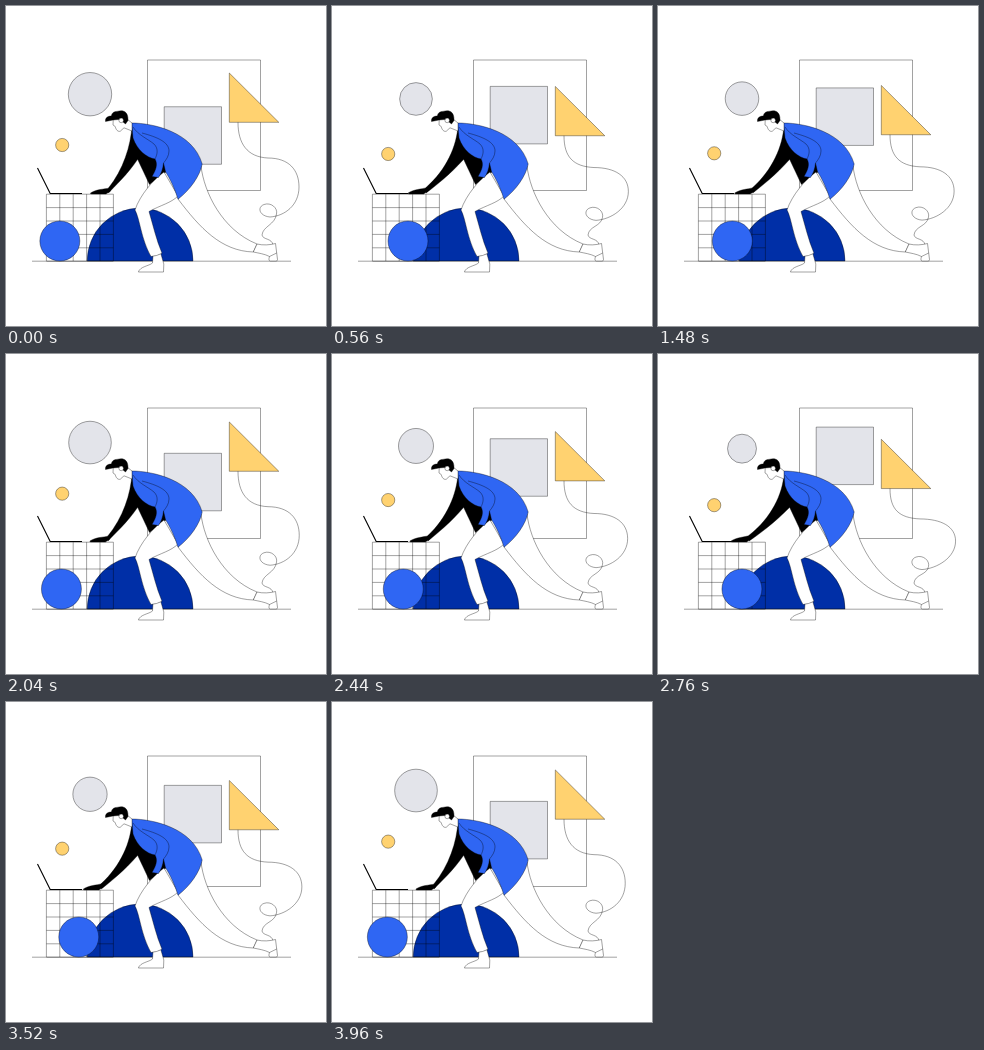
Animation, 320 px wide and 320 px high, one loop 4 s. Source, as an HTML page:

```html
<!DOCTYPE html>
<html lang="en">
<head>
<meta charset="utf-8">
<title>Working pose</title>
<style>
  html, body { margin: 0; width: 100%; height: 100%; overflow: hidden; background: #fff; }
  svg { display: block; width: 100%; height: 100%; }
  .line { fill: none; }
  .white { fill: #fff; }
  .black { fill: #000; }
  .blue { fill: #2f66f3; }
  .navy { fill: #002fa7; }
  .grey { fill: #e3e4ea; }
  .yellow { fill: #ffd270; }
</style>
</head>
<body>
<svg viewBox="0 0 320 320" stroke="#000" stroke-width=".37" stroke-linejoin="round">
  <rect class="white" x="141.5" y="54" width="113" height="130.5"/>
  <rect id="square" class="grey" x="158.2" width="57.3" height="57.5"/>
  <path id="triangle" class="yellow" d="M223.3 0V49.3H272.8Z"/>
  <path id="string" class="line"/>
  <circle id="balloon" class="grey" cx="84"/>
  <circle id="ball" class="yellow" cx="56.2" r="6.6"/>

  <path class="navy" d="M81.2 255A52.9 52.9 0 0 1 187 255Z"/>
  <path id="grid" class="line"/>
  <path class="line" d="M26 255.2H285"/>
  <circle id="wheel" class="blue" cy="235" r="20"/>

  <!-- back leg and shoe -->
  <path class="white" d="M195 160C198 186 216 224 251 238L247.3 246C215 245 194 222 172 193Z"/>
  <path class="white" d="M251 238C257 239.5 264 239 269.5 237.5L271.5 253.5Q271.5 255 270 255H264.5Q262 255 263.5 250.5C259 248 252 247 247.3 246Z"/>
  <path class="line" d="M263.5 250.5L270.7 247"/>

  <path id="arm" class="black"/>
  <path class="black" d="M126 118L131 152L143.5 178.5L160 166L158 140Z"/>

  <!-- front leg and shoe -->
  <path class="white" d="M147 249.5L146.5 257C143 260 134 260.5 132.4 266H157.5L157.8 258L154.8 247.5Z"/>
  <path class="white" d="M158 166C147 174 134 189 129 204C134 213 135 233 145 250.5Q151 250 156 247.3C150 233 147 219 143 205.5C155 199 165 197 172 190Z"/>

  <!-- jacket -->
  <path class="blue" d="M125.5 117C147 117 187 126 196.2 158C194 170 184 184 172 193.2C169 183 164 173 159.5 165.5L157.5 157C157 163 155 168 152.5 171.5L146 170.5C150 164 152 158 149 153C141 152 131 144 127 132Z"/>
  <path class="line" d="M127 121C132 129 142 133 148 138C153 143 151 149 149 153M136 127C151 131 163 136 163 145C163 150 160 154 157.5 157"/>

  <!-- head -->
  <path class="white" d="M107.3 112L107 119L109.2 120.5C110 124 112 126 114.3 125.2L118 121.8L126 125V117L121 113Z"/>
  <path class="black" d="M99.5 115.5C99 111.5 102 110 105.3 110C106 106 109 105.5 112 105.2C116 104 122.5 104.5 122 114.5L119.5 118L117 116V113.5L112.5 113.5L107 114Z"/>
  <circle class="white" cx="115.2" cy="114.4" r="2.3"/>

  <path class="line" d="M31.5 162L44.2 187.5H76" stroke-width="1.1"/>
  <path id="hand" class="black"/>
</svg>
<script>
const set = (id, name, value) => document.getElementById(id).setAttribute(name, value);

let grid = "";
for (let i = 0; i <= 5; i++) {
  grid += `M${40.4 + i * 13.4} 188.2V255M40.4 ${188.2 + i * 13.4}H107.4`;
}
set("grid", "d", grid);

// p runs from 0 to 1 and back
function pose(p) {
  const triangleY = 67 + 24 * p;
  set("triangle", "transform", `translate(0 ${triangleY})`);
  set("square", "y", 100.8 - 36.4 * p);
  set("balloon", "r", 21.7 - 9.5 * p);
  set("balloon", "cy", 88.2 + 8.5 * p);
  set("ball", "cy", 139 + 16 * p);
  set("wheel", "cx", 53.8 + 39.6 * p);

  const top = triangleY + 49.3, bend = 152 + 17 * p, right = 293 + 6 * p, drop = 6 * p;
  set("string", "d", `M232 ${top}C232 ${top + 21} 241 ${bend - 1} 262 ${bend}
    C283 ${bend} ${right} ${164 + 11 * p} ${right} ${181 + 8 * p}
    C${right} ${199 + drop} 279 ${210 + drop} 264 ${211 + drop}
    C253 ${210 + drop} 251 ${201 + drop} 258 ${198.5 + drop}
    C265 ${196 + drop} 272 ${202 + drop} 270.5 ${208 + drop}
    C269 ${219 + drop / 2} 257 220 256 229C257 234 266 232 267 239`);

  const reach = 15 * p, slack = 5 * p;
  const wristX = 102.5 - reach, wristY = 182 - p;
  set("arm", "d", `M126 119C125 140 ${117 - slack} 164 ${wristX} ${wristY}
    L${wristX} 187C${108 - reach * .7} 181 ${122 - reach * .4} 168 131.5 153.5L140 140Z`);
  set("hand", "d", `M${wristX + 1} ${wristY}C${97 - reach} 183.5 ${91 - reach} 183 ${84.5 - reach} 187
    Q${84 - reach} 188 ${86 - reach} 188H${100 - reach}L${wristX + 2} 185Z`);
}

const start = performance.now();
function tick() {
  const phase = (performance.now() - start) % 2000 / 1000;
  pose(1 - Math.abs(1 - phase));
  requestAnimationFrame(tick);
}
tick();
</script>
</body>
</html>
```
